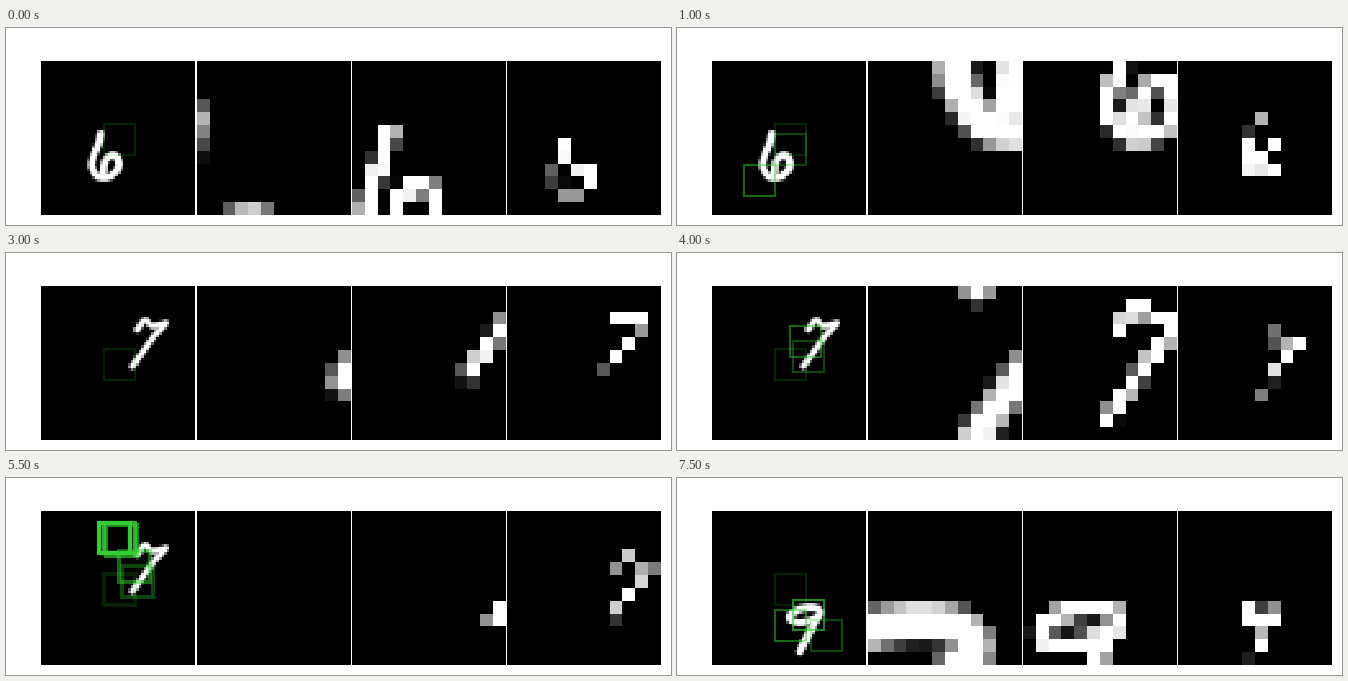
A matplotlib script for the animation above (8000 ms loop, 665x197 px).

```python
import numpy as np
import matplotlib.pyplot as plt
from matplotlib.animation import FuncAnimation
from matplotlib.patches import Rectangle

W, H, DPI = 665, 197, 100
SIZE, PATCH, STEPS = 60, 12, 6


def spline(*pts, n=12):
    """Catmull-Rom curve through the points."""
    p = np.array([pts[0], *pts, pts[-1]], float)
    t = np.linspace(0, 1, n)[:, None]
    return np.vstack([
        b + t * (c - a) / 2 + t**2 * (a - 2.5 * b + 2 * c - d / 2)
        + t**3 * (1.5 * (b - c) + (d - a) / 2)
        for a, b, c, d in zip(p, p[1:], p[2:], p[3:])])


def oval(cx, cy, a, b, tilt):
    t = np.linspace(0, 2 * np.pi, 60)
    u, v = a * np.cos(t), b * np.sin(t)
    return np.c_[cx + u * np.cos(tilt) - v * np.sin(tilt),
                 cy + u * np.sin(tilt) + v * np.cos(tilt)]


def render(radius, *strokes):
    """Rasterise round strokes with a soft one-pixel edge."""
    y, x = np.mgrid[:SIZE, :SIZE]
    dist = np.full((SIZE, SIZE), np.inf)
    for px, py in np.vstack(strokes):
        dist = np.minimum(dist, np.hypot(x - px, y - py))
    return np.clip(radius + 0.5 - dist, 0, 1)


def look(x, y, dx=0, dy=0):
    """Box corner, and the glimpse centre that strays from its middle."""
    return (x, y), (x + PATCH // 2 + dx, y + PATCH // 2 + dy)


def glimpse(img, centre, scale):
    """Sample a patch around the centre, kept inside the image."""
    span = PATCH * scale
    x0, y0 = (min(max(c - span // 2, 0), SIZE - span) for c in centre)
    return img[y0:y0 + span:scale, x0:x0 + span:scale]


six = render(1.4, spline((22.8, 28), (21.8, 32), (19.7, 37.5), (19.4, 41),
                         (22.2, 44.7), (27, 44.2), (30, 40), (28, 36.1),
                         (24.5, 38.3), (23.8, 43)))
seven = render(1.2, spline((37, 16.5), (40, 12.9), (43, 15), (48.2, 14)),
               spline((48.2, 14), (42.9, 20), (35.1, 30.8), n=30))
nine = render(1.5, oval(35.8, 40, 6, 2.7, -0.2),
              spline((41.7, 38.8), (33.7, 54.2), n=30))

start = look(24, 24)
episodes = [
    (six, [start, look(24, 28, -3, -3), look(12, 40, 1), look(14, 33, 0, 5),
           look(11, 27, 0, -3), look(15, 26, 0, -3)]),
    (seven, [start, look(31, 21), look(30, 15, -1, 2), look(25, 5, -3, 5),
             look(24, 4), look(22, 4)]),
    (nine, [start, look(38, 42, 0, 3), look(24, 38, -2), look(31, 34, 3, -5)]),
]
frames = [(digit, path[:i + 1])
          for digit, path in episodes for i in range(len(path))]

fig = plt.figure(figsize=(W / DPI, H / DPI), dpi=DPI, facecolor="white")


def panel(left, n):
    # Slightly inset so the edges round to whole pixels.
    side = 153.8
    ax = fig.add_axes([(left + 0.1) / W, 10.1 / H, side / W, side / H])
    ax.axis("off")
    im = ax.imshow(np.zeros((n, n)), cmap="gray", vmin=0, vmax=1,
                   interpolation="nearest", aspect="auto")
    return ax, im


main_ax, main_im = panel(35, SIZE)
views = [panel(left, PATCH)[1] for left in (191, 346, 501)]
boxes = [main_ax.add_patch(Rectangle((0, 0), PATCH, PATCH, fill=False,
                                     edgecolor="limegreen",
                                     alpha=(i + 1) / STEPS))
         for i in range(STEPS)]


def draw(k):
    img, path = frames[k]
    main_im.set_data(img)
    for view, scale in zip(views, (1, 2, 4)):
        view.set_data(glimpse(img, path[-1][1], scale))
    for i, box in enumerate(boxes):
        box.set_visible(i < len(path))
        box.set_linewidth(3 if len(path) == STEPS else 1.5)
        if i < len(path):
            box.set_xy(path[i][0])
    return [main_im, *views, *boxes]


anim = FuncAnimation(fig, draw, frames=len(frames), interval=500,
                     repeat=True, repeat_delay=0)
plt.show()
```
